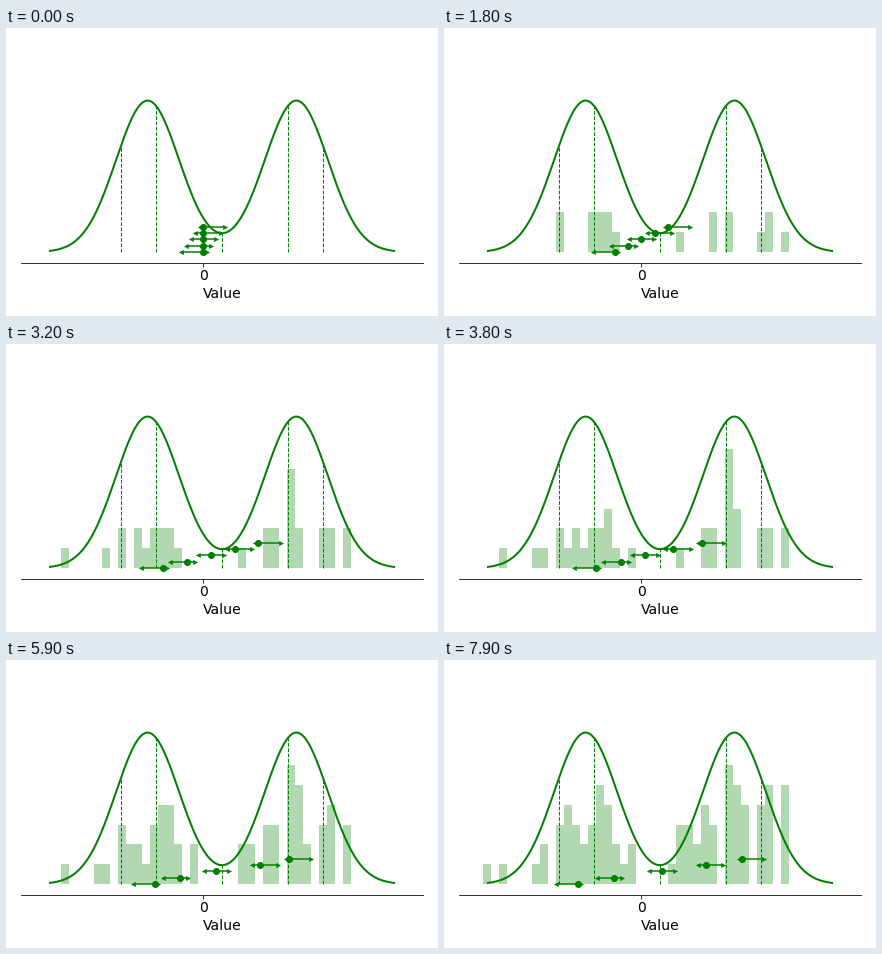
A matplotlib script that plays this animation: 432x288 px, repeating every 8000 ms.

```python
import numpy as np
import matplotlib.pyplot as plt
from matplotlib.animation import FuncAnimation

W, H, DPI = 432, 288, 72
FRAMES, INTERVAL = 80, 100
GREEN = "green"

# Mixture of two normals and the quantile levels being learned
MEANS, SD = (-3, 5), 1.7
TAUS = np.array([0.1, 0.3, 0.5, 0.7, 0.9])
RATE = 0.2

# Histogram grid; each draw is given by its bin index
EDGE, BIN_W, N_BINS = -8.505, 0.4328, 38
DRAWS = np.array([
    15, 30, 9, 37, 13, 34, 28, 16, 35, 14,
    30, 9, 35, 24, 14, 28, 13, 15, 7, 30,
    27, 12, 31, 11, 30, 31, 37, 2, 27, 30,
    11, 34, 15, 31, 10, 18, 6, 30, 31, 9,
    37, 27, 14, 16, 18, 25, 15, 24, 25, 28,
    13, 31, 32, 14, 10, 34, 35, 35, 32, 7,
    14, 17, 37, 12, 23, 26, 27, 37, 24, 35,
    32, 11, 25, 26, 10, 10, 0, 32, 34,
])

# Layout in pixels
X_UNIT, Y_UNIT = 18.6, 19.9
LEFT, RIGHT, TOP, BOTTOM = 15, 417, 14.5, 234.5
BASE = 224.2
PEAK = 7.62
ROW_STEP = 0.32
SHAFT, HEAD = 23.3 / X_UNIT, 1.1 / X_UNIT


def density(x):
    return PEAK * sum(np.exp(-((x - m) / SD) ** 2 / 2) for m in MEANS)


def quantiles(taus):
    x = np.linspace(-12, 14, 20001)
    cdf = np.cumsum(density(x))
    return np.interp(taus, cdf / cdf[-1], x)


def learn(values):
    """Quantile regression: one row of estimates per number of draws seen."""
    path = [np.zeros(len(TAUS))]
    for v in values:
        path.append(path[-1] + RATE * (TAUS - (v < path[-1])))
    return np.array(path)


path = learn(EDGE + (DRAWS + 0.5) * BIN_W)

plt.rcParams.update({"font.family": "DejaVu Sans", "font.size": 14})
fig = plt.figure(figsize=(W / DPI, H / DPI), dpi=DPI, facecolor="white")
ax = fig.add_axes([LEFT / W, 1 - BOTTOM / H, (RIGHT - LEFT) / W, (BOTTOM - TOP) / H])
half = (RIGHT - LEFT) / 2 / X_UNIT
ax.set_xlim(1 - half, 1 + half)
ax.set_ylim((BASE - BOTTOM) / Y_UNIT, (BASE - TOP) / Y_UNIT)
ax.spines[["left", "right", "top"]].set_visible(False)
ax.set_xticks([0], ["0"])
ax.set_yticks([])
ax.set_xlabel("Value")

bars = ax.bar(EDGE + np.arange(N_BINS) * BIN_W, np.zeros(N_BINS), BIN_W,
              align="edge", color=GREEN, alpha=0.3, linewidth=0)

x = np.linspace(-8.25, 10.25, 400)
ax.plot(x, density(x), color=GREEN, lw=2)
for q in quantiles(TAUS):
    ax.plot([q, q], [0, density(q)], color=GREEN, ls="--", lw=1)

rows = np.arange(len(TAUS)) * ROW_STEP
shafts = [ax.plot([], [], color=GREEN, lw=1.5, solid_capstyle="butt")[0] for _ in rows]


def marks(shape, size, edge):
    return ax.plot([], [], shape, color=GREEN, ms=size, mew=edge, ls="none")[0]


dots = marks("o", 6, 1)
tips_left = marks("<", 4.5, 0.3)
tips_right = marks(">", 4.5, 0.3)


def update(n):
    counts = np.bincount(DRAWS[:n], minlength=N_BINS)
    for bar, c in zip(bars, counts):
        bar.set_height(c)
    theta = path[n]
    lo = theta - (1 - TAUS) * SHAFT - HEAD
    hi = theta + TAUS * SHAFT + HEAD
    for line, a, b, y in zip(shafts, lo, hi, rows):
        line.set_data([a, b], [y, y])
    dots.set_data(theta, rows)
    tips_left.set_data(lo, rows)
    tips_right.set_data(hi, rows)
    return [*bars, *shafts, dots, tips_left, tips_right]


anim = FuncAnimation(fig, update, frames=FRAMES, interval=INTERVAL, repeat=True)
plt.show()
```
